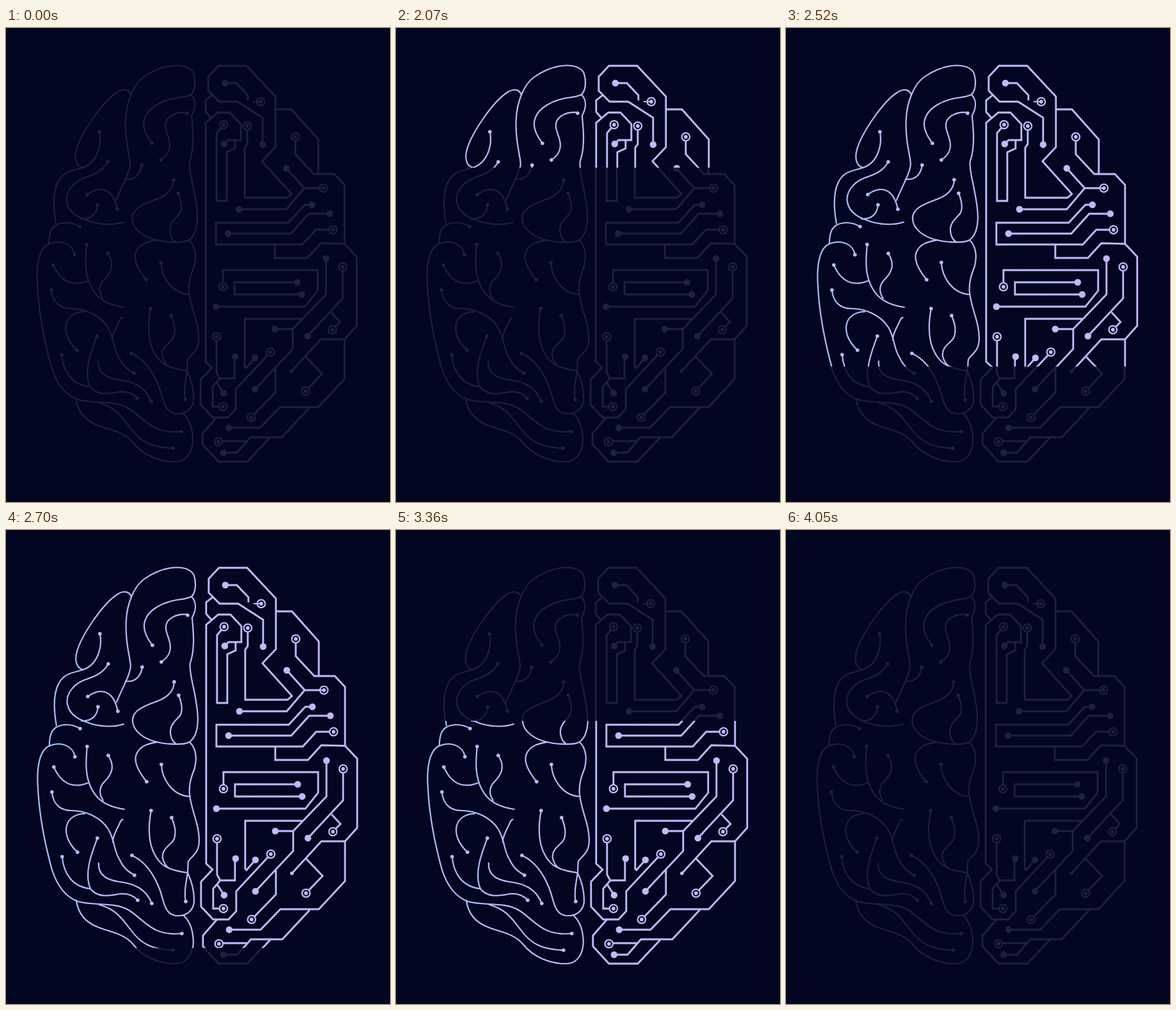
Recreate the animation shown at these times as an HTML page. Size 600 px wide and 740 px high, loop 5310 ms.

```html
<!DOCTYPE html>
<html lang="en">
<head>
<meta charset="utf-8">
<title>Brain and circuit</title>
<style>
html, body { margin: 0; height: 100%; overflow: hidden; background: #020621; }
svg { display: block; }
path { fill: none; stroke-linejoin: miter; }
.organic { stroke-width: 2.1; stroke-linecap: round; }
.circuit { stroke-width: 2.8; }
.thin { stroke-width: 1.8; }
.ring { fill: #020621; stroke-width: 2.2; }
.dot { stroke: none; }
</style>
</head>
<body>
<svg width="600" height="740" viewBox="0 0 600 740">
<defs>
  <linearGradient id="glow" gradientUnits="userSpaceOnUse" x1="47" y1="0" x2="550" y2="0">
    <stop offset="0" stop-color="#a3c3fb"/>
    <stop offset=".5" stop-color="#bdbdf9"/>
    <stop offset="1" stop-color="#c6b4f9"/>
  </linearGradient>
  <clipPath id="band"><rect id="window" width="600"/></clipPath>
  <g id="brain">
    <g class="organic">
      <!-- upper lobes -->
      <path d="M289 104C297 96 296 80 293 71C286 54 250 53 216 76C198 88 188 118 187 142C185 176 193 196 194 212C193 228 180 248 172 269"/>
      <path d="M228 180C218 167 212 152 217 140C223 124 243 114 262 110C272 108 281 108 289 104"/>
      <path d="M283 132C268 130 249 137 249 152C249 163 257 172 256 185C255 195 250 200 242 206"/>
      <path d="M195 105C193 96 184 94 174 100C150 115 117 165 110 190C106 205 110 216 120 218"/>
      <path d="M146 162C150 182 143 210 120 218C103 223 90 224 82 239C72 257 74 282 78 305"/>
      <path d="M159 209C151 224 137 229 122 234C104 241 93 256 95 271C98 291 118 298 134 303C150 307 168 308 183 303"/>
      <path d="M143 276C142 290 133 299 117 298M127 260C142 249 166 244 174 283M212 214C210 228 202 238 186 236"/>
      <path d="M262 237C262 252 250 262 236 267C217 274 197 281 197 297C197 315 217 327 235 331C252 335 277 336 286 331"/>
      <path d="M269 258C274 270 276 283 271 290C265 297 257 302 256 314C256 322 259 330 264 333"/>
      <!-- inner edge -->
      <path d="M289 104C297 112 297 124 290 137C292 158 295 185 287 208C284 224 299 262 299 295C299 312 294 325 286 331C298 342 297 360 294 372C288 387 285 398 286 412C289 440 302 460 301 487C300 507 287 510 284 518C283 525 284 530 283 535C290 550 294 565 293 582C291 595 280 604 264 602C246 599 246 578 239 560C230 537 216 517 196 508"/>
      <!-- middle and outer edge -->
      <path d="M115 310C100 301 78 302 71 315C68 321 67 328 67 337"/>
      <path d="M107 354C104 336 84 330 67 337C52 343 47 370 49 400C51 445 60 490 71 530C80 558 95 574 112 580C135 587 170 580 192 594C219 612 228 634 274 630"/>
      <path d="M74 370C84 393 101 405 127 395M126 338C124 360 122 385 134 406C144 425 162 433 184 436"/>
      <path d="M159 352C171 370 163 383 153 393C145 401 144 412 151 422M219 393C207 378 198 362 203 350C209 335 225 333 236 331M242 366C243 390 260 414 285 416"/>
      <!-- lower lobes -->
      <path d="M71 409C73 430 86 438 101 438C122 438 146 447 159 467C170 485 167 500 177 515C183 528 190 533 200 539"/>
      <path d="M182 452C179 452 178 455 176 460C170 471 166 480 166 487M111 503C97 490 91 475 94 462C97 450 108 443 122 443"/>
      <path d="M142 481C133 505 121 535 131 560M87 510C89 535 102 557 131 560C143 576 165 570 178 568C190 567 199 571 205 578"/>
      <path d="M144 520C143 537 155 546 175 549C200 552 218 560 227 583"/>
      <path d="M226 438C221 465 221 495 237 515C246 528 262 532 282 535M258 449C265 465 266 480 258 488C248 497 243 502 244 512C246 520 249 525 254 528M280 580C277 565 281 550 283 535"/>
      <path d="M145 585C172 592 182 609 194 624C209 645 226 655 261 656"/>
      <path d="M109 578C112 599 124 613 143 620C163 628 184 630 198 647C213 666 240 678 267 677C283 676 292 661 292 642C291 623 287 612 277 602"/>
    </g>
    <g class="circuit">
      <path d="M342 86H360L378 105V113M401 181V140L362 115H333L316 98V76L332 59H376L421 107V186L400 208L446 259L439 265H373V187L377 181V153"/>
      <path d="M322 105L312 113V131L320 140M341 181L347 175H367V150L350 132H331L312 148V521L322 530L304 549V588L323 608H347L359 595V564L413 506M358 175V188L345 194V270H329V164L340 151"/>
      <path d="M421 127H446L488 174V227M452 170V197L481 228H513L529 245V337M438 219L466 250H496M466 250L438 283H364"/>
      <path d="M478 276H467L441 304H328V338H463L484 315H511M506 290H473L445 321H347"/>
      <path d="M420 338V359H471L492 336L529 337L548 357V465L529 486H492L446 536M529 486V548L488 592H428L397 624H348"/>
      <path d="M339 404V378H487V410L467 435H328M455 397H357V416H462M526 373V422L471 481M508 444L522 459L510 471"/>
      <path d="M420 470H448L500 416V360M389 564L448 501V470M389 515L375 531L373 529V454H462M383 608L421 569V531M468 567L494 540L468 513"/>
      <path d="M329 482V538L334 547H357V513M334 547L329 553L340 570M329 553L323 560V591H339"/>
      <path d="M474 593L431 639H382L361 663H340M376 645H332M329 608L307 633V650L332 677H377L412 640"/>
    </g>
    <g id="nodes"></g>
    <path class="thin" d="M386 115H398M489 250H496"/>
  </g>
</defs>
<use href="#brain" fill="#1f1f40" stroke="#1f1f40"/>
<g clip-path="url(#band)"><use href="#brain" x=".8" fill="url(#glow)" stroke="url(#glow)"/></g>
</svg>
<script>
const $ = id => document.getElementById(id);
const nodes = $('nodes');

function circles(points, r, cls) {
  for (const point of points.split(' ')) {
    const [x, y] = point.split(',');
    nodes.insertAdjacentHTML('beforeend', `<circle class="${cls}" cx="${x}" cy="${y}" r="${r}"/>`);
  }
}

const tips = '228,180 283,133 242,206 146,162 159,209 127,260 143,276 174,283 212,214 262,237 269,258 ' +
  '115,310 107,354 74,370 126,338 159,352 219,393 242,366 71,409 111,503 142,481 87,510 200,539 ' +
  '205,578 227,583 196,508 226,438 258,449 280,580 274,630 261,656 446,536';
const pads = '342,86 401,182 341,181 438,219 364,283 478,276 506,290 347,321 500,360 455,397 462,416 ' +
  '328,435 420,470 471,481 358,513 389,515 389,564 340,570 348,624 340,663';
const rings = '398,115 340,151 377,153 452,170 496,250 511,315 526,373 339,404 510,471 329,482 413,506 ' +
  '468,567 339,591 383,608 332,646';
circles(tips, 2.8, 'dot');
circles(pads, 5.2, 'dot');
circles(rings, 6.2, 'ring');
circles(rings, 2.9, 'dot');

// A lit band: its lower edge sweeps down first, its upper edge follows.
function draw() {
  const t = Math.floor(performance.now() % 5310 / 30) * 30;
  const bottom = Math.max(0, 73 + (t - 1860) * 0.69);
  const top = Math.max(0, 131 + (t - 3060) * 0.557);
  $('window').setAttribute('y', top);
  $('window').setAttribute('height', Math.max(0, bottom - top));
  requestAnimationFrame(draw);
}
draw();
</script>
</body>
</html>
```
